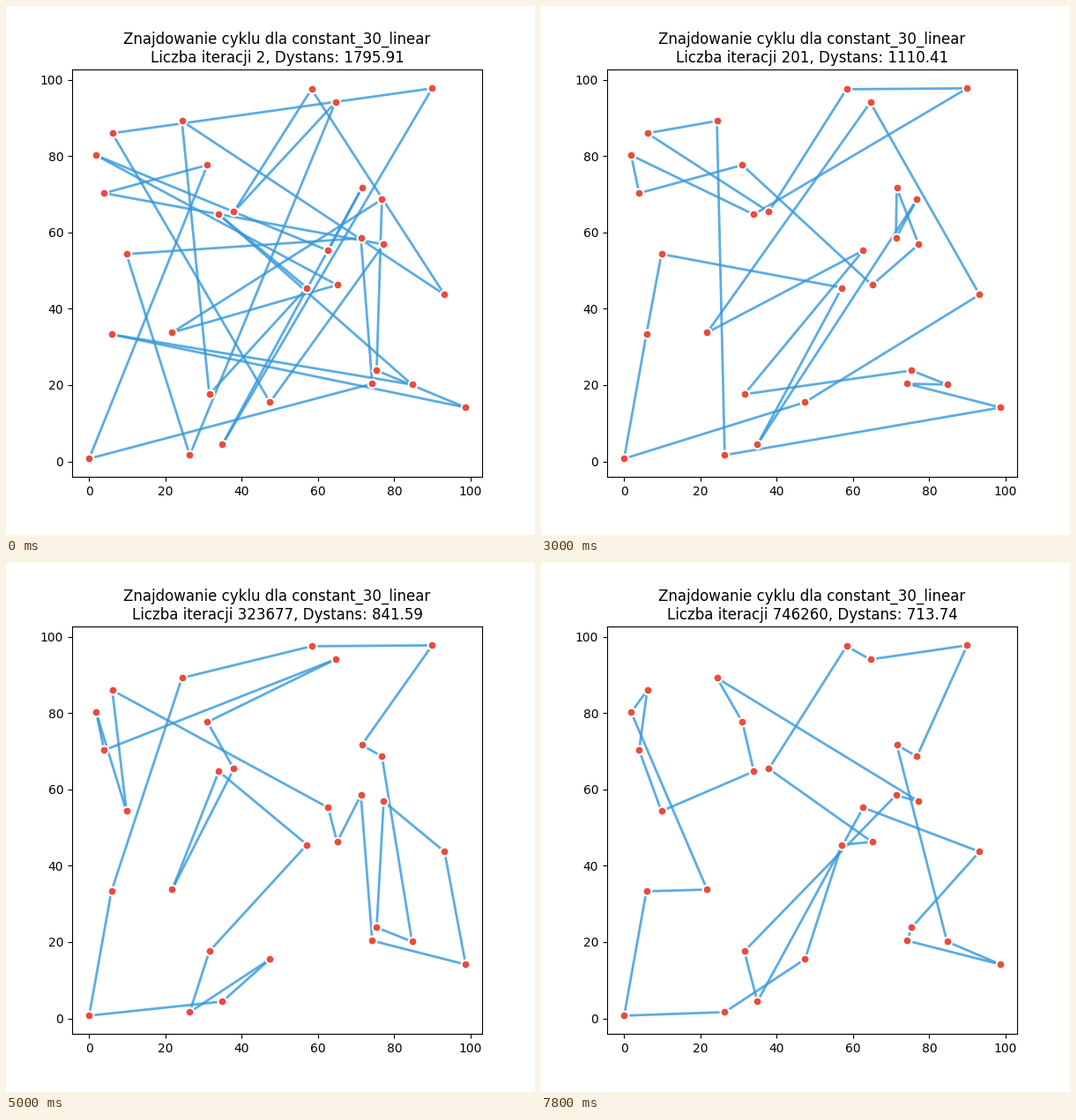
A matplotlib script for the animation above (8000 ms loop, 600 by 600 pixels).

```python
import numpy as np
import matplotlib.pyplot as plt
from matplotlib.animation import FuncAnimation
from matplotlib.collections import LineCollection

STEP = 200
FRAMES = 40
PX_PER_UNIT = 4.327
ORIGIN = np.array([94.2, 516.5])   # stage position of data point (0, 0)

city_x = [94.3, 102.3, 111.3, 120.5, 119.5, 136.6, 188.4, 199.5, 208.4, 228.4,
          230.6, 241.4, 245.4, 258.4, 299.4, 341.3, 346.5, 365.4, 373.5, 375.5,
          402.5, 403.5, 415.4, 420.4, 426.4, 428.4, 460.5, 483.4, 497.4, 521.4]
city_y = [513.4, 169.4, 212.3, 144.3, 372.4, 281.4, 370.4, 130.4, 509.4, 180.4,
          440.4, 236.4, 497.4, 233.4, 449.4, 319.5, 94.4, 277.4, 109.4, 316.4,
          263.4, 206.4, 428.4, 413.4, 219.4, 270.4, 429.4, 93.4, 327.4, 455.4]
cities = (np.column_stack([city_x, city_y]) - ORIGIN) / PX_PER_UNIT * [1, -1]

stages = []


def tour_edges(tour):
    pts = cities[tour]
    return np.stack([pts, np.roll(pts, -1, axis=0)], axis=1)


def tour_length(tour):
    edges = tour_edges(tour)
    return np.hypot(*(edges[:, 1] - edges[:, 0]).T).sum()


def add_stage(ms, iterations, distance, *stops):
    """A tour through city 0 that the search has reached at a given time."""
    tour = [0, *stops]
    stages.append((ms // STEP, iterations, distance - tour_length(tour), tour))


add_stage(0, 2, 1795.91, 22, 20, 5, 8, 18, 13, 16, 28, 7, 10, 15, 11, 26, 4,
          29, 23, 24, 6, 19, 1, 17, 21, 12, 27, 3, 14, 25, 2, 9)
add_stage(1200, 17, 1484.62, 22, 6, 8, 28, 18, 13, 24, 5, 1, 10, 15, 11, 26,
          29, 4, 14, 25, 7, 16, 23, 19, 21, 12, 27, 17, 20, 3, 2, 9)
add_stage(3000, 201, 1110.41, 4, 5, 15, 12, 24, 20, 21, 25, 19, 9, 2, 1, 11,
          27, 16, 13, 3, 7, 8, 29, 22, 26, 23, 10, 17, 6, 18, 28, 14)
add_stage(4200, 85879, 945.46, 20, 15, 25, 28, 24, 17, 21, 3, 1, 2, 27, 16,
          18, 19, 7, 13, 29, 26, 14, 12, 8, 4, 6, 10, 22, 23, 9, 11, 5)
add_stage(5000, 323677, 841.59, 4, 7, 16, 27, 21, 24, 26, 23, 25, 28, 29, 22,
          20, 19, 17, 3, 5, 1, 2, 18, 9, 13, 6, 11, 15, 10, 8, 14, 12)
add_stage(6400, 684376, 775.99, 8, 12, 14, 10, 28, 26, 22, 29, 15, 17, 18, 27,
          16, 24, 13, 7, 3, 1, 2, 9, 11, 6, 4, 5, 20, 25, 19, 21, 23)
add_stage(7800, 746260, 713.74, 4, 6, 1, 3, 2, 5, 11, 9, 7, 25, 20, 10, 12,
          17, 28, 23, 22, 29, 26, 21, 24, 27, 18, 16, 13, 19, 15, 14, 8)


def reversals(tour, goal):
    """Tours passed through while segment reversals turn one into the other."""
    path = [tour]
    for k, city in enumerate(goal):
        j = tour.index(city)
        if j != k:
            tour = tour[:k] + tour[k:j + 1][::-1] + tour[j + 1:]
            path.append(tour)
    return path


def shortest_path(tour, goal):
    backwards = goal[:1] + goal[:0:-1]
    return min(reversals(tour, goal), reversals(tour, backwards), key=len)


def build_states():
    states = []
    for (f0, n0, c0, a), (f1, n1, c1, b) in zip(stages, stages[1:]):
        path = shortest_path(a, b)
        for f in range(f0, f1):
            t = (f - f0) / (f1 - f0)
            tour = path[round(t * (len(path) - 1))]
            count = round(n0 * (n1 / n0) ** t)
            states.append((count, tour_length(tour) + c0 + (c1 - c0) * t, tour))
    _, count, correction, tour = stages[-1]
    states.append((count, tour_length(tour) + correction, tour))
    return states


states = build_states()

fig, ax = plt.subplots(figsize=(6, 6), dpi=100)
fig.subplots_adjust(left=0.125, right=0.9, bottom=0.11, top=0.88)
ax.set_xlim((np.array([75, 540]) - ORIGIN[0]) / PX_PER_UNIT)
ax.set_ylim((ORIGIN[1] - np.array([534, 72])) / PX_PER_UNIT)
ax.set_xticks(range(0, 101, 20))
ax.set_yticks(range(0, 101, 20))

lines = LineCollection([], colors="#3498db", linewidths=2, alpha=0.8, zorder=1)
ax.add_collection(lines, autolim=False)
ax.scatter(*cities.T, s=50, c="#e74c3c", edgecolors="white", linewidths=1.5,
           zorder=2)
title = ax.set_title("", fontsize=12)


def draw(frame):
    count, distance, tour = states[frame]
    lines.set_segments(tour_edges(tour))
    title.set_text("Znajdowanie cyklu dla constant_30_linear\n"
                   f"Liczba iteracji {count}, Dystans: {distance:.2f}")
    return lines, title


anim = FuncAnimation(fig, draw, frames=FRAMES, interval=STEP,
                     init_func=lambda: draw(0), repeat=True, repeat_delay=0)
plt.show()
```
